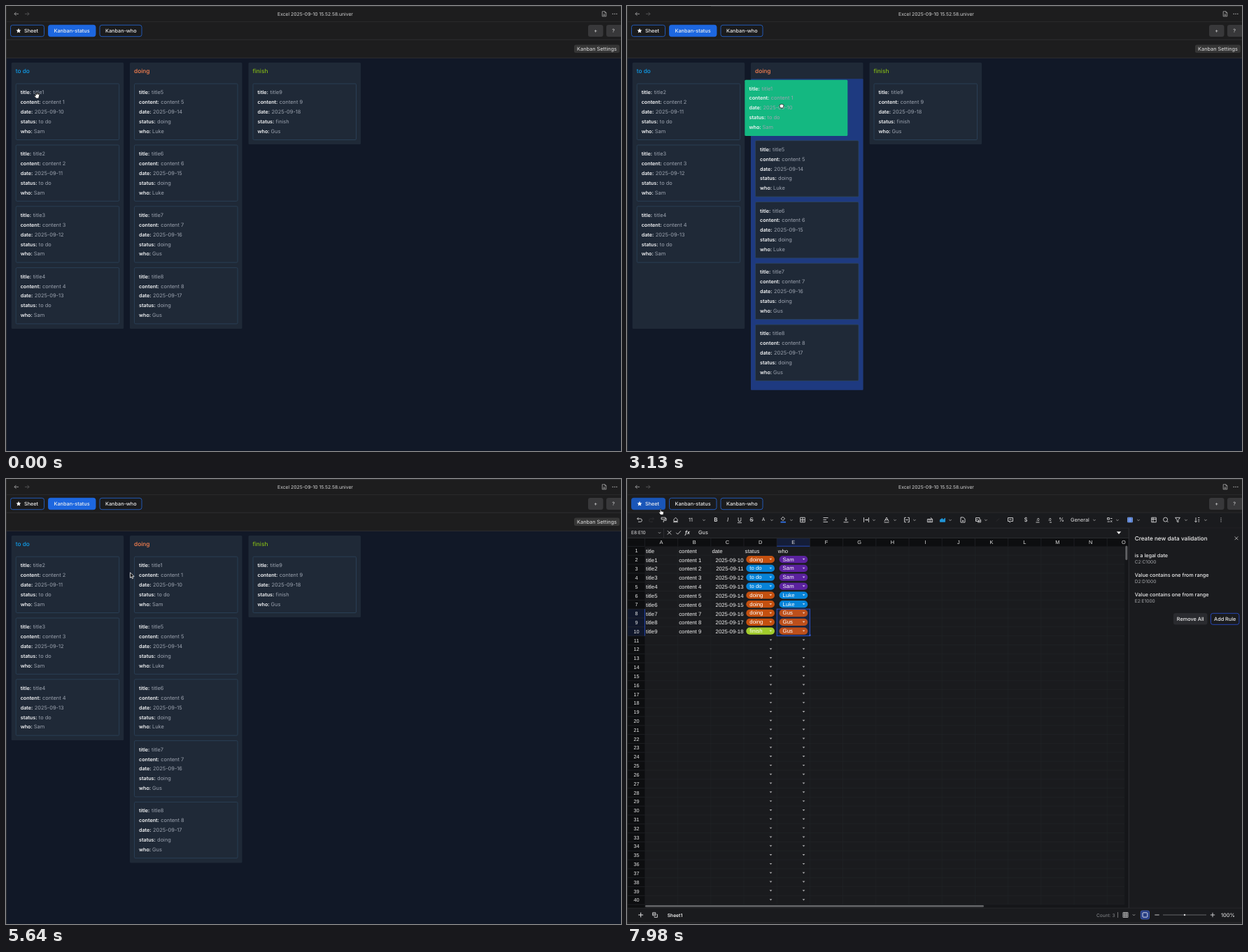
Animation, 879 px wide and 637 px high, one loop 8 s. Source, as an HTML page:

```html
<!DOCTYPE html>
<html lang="en">
<head>
<meta charset="utf-8">
<title>Kanban board</title>
<style>
  html, body { margin: 0; width: 100%; height: 100%; overflow: hidden; background: #111827; }
  svg { display: block; width: 879px; height: 637px; font-family: Inter, sans-serif; text-rendering: geometricPrecision; }
  .cell { font-family: "Liberation Sans", Arial, sans-serif; }
</style>
</head>
<body>
<svg id="stage" viewBox="0 0 879 637"></svg>
<script>
const stage = document.getElementById('stage');
const LOOP = 8000, TICK = 148;
const BLUE = '#1d67e0', PANEL = '#1f2937', LIGHT = '#e2e2e3';

// Drawing helpers
const text = (x, y, s, size = 7.3, fill = LIGHT, attrs = '') =>
  `<text x="${x}" y="${y}" font-size="${size}" fill="${fill}" ${attrs}>${s}</text>`;
const rect = (x, y, w, h, fill, r = 0, stroke = 'none', sw = 0.9) =>
  `<rect x="${x}" y="${y}" width="${w}" height="${h}" rx="${r}" fill="${fill}" stroke="${stroke}" stroke-width="${sw}"/>`;
const icon = (x, y, d, stroke = LIGHT, fill = 'none', sw = 0.85) =>
  `<path transform="translate(${x} ${y})" d="${d}" fill="${fill}" stroke="${stroke}" stroke-width="${sw}" stroke-linejoin="round"/>`;
const line = (x1, y1, x2, y2, c) => icon(0, 0, `M${x1} ${y1}L${x2} ${y2}`, c, 'none', 0.8);
const range = (a, b) => Array.from({ length: b - a + 1 }, (_, i) => a + i);
const MID = 'text-anchor="middle"', W5 = 'font-weight="500"', W6 = 'font-weight="600"';

// Linear interpolation over rows of [tick, ...values]
function at(keys, k) {
  const i = keys.findIndex(q => q[0] > k);
  if (i < 0) return keys[keys.length - 1].slice(1);
  if (i === 0) return keys[0].slice(1);
  const a = keys[i - 1], b = keys[i], f = (k - a[0]) / (b[0] - a[0]);
  return a.slice(1).map((v, j) => v + (b[j + 1] - v) * f);
}

// Data
const who = n => n < 5 ? 'Sam' : n < 7 ? 'Luke' : 'Gus';
const status = n => n < 5 ? 'to do' : n < 9 ? 'doing' : 'finish';
const date = n => `2025-09-${9 + n}`;

// Motion
const LIFT = 10, OVER = 17, DROP = 28, HOVER = 48, SHEET = 51, READY = 53;
const cursorPath = [
  [0, 45, 128], [4, 49.5, 133], [5, 49.5, 133], [6, 56.5, 147], [9, 56.5, 147], [12, 69, 141],
  [17, 190, 130], [18, 203, 134], [21, 221, 143], [23, 226, 143], [25, 226, 142.5], [29, 227, 142],
  [31, 229.5, 143], [32, 229.5, 143], [33, 230, 144], [35, 230, 144], [42, 113, 131], [43, 113, 131],
  [49, 36, 42], [50, 37, 42], [52, 38, 42], [53, 43, 44], [54, 49, 47]];
const dragPath = [[10, 15.5, 110], [12, 20.5, 107.5], [17, 110.5, 93], [18, 138, 95], [21, 168, 105.5],
  [23, 182, 107], [24, 182, 107], [28, 183.5, 111]];
const closeUp = [[10, 88], [11, 55], [12, 10], [13, 0]];
const makeRoom = [[17, 0], [18, 28], [19, 70], [20, 81.5]];
const shrink = [[29, 381], [31, 293]];

const HANDS = {
  grab: 'M-2.6.8-3.2-1.8q.5-1 1.2-.2l.5 1-.3-2.4q.8-.9 1.4 0l.3 1.9.3-1.8q.8-.8 1.3.1l-.1 2 .6-1.2q.9-.5 1.1.4l-.9 3.8q-.3 2-1 2.4h-2.9l-2.7-3q-.1-1.1.9-.9z',
  fist: 'M-3-.6q.3-1.8 1.6-1.4.8-.8 1.6-.2.9-.5 1.5.2 1.4-.1 1.3 1.2l-.4 2.2q-.5 1.4-1.2 1.6h-2.9q-1.3-1.2-1.5-3.6z',
  point: 'M-1.8.8V-3.8q.8-1.1 1.6 0V-1l2.7.6q1 .3.9 1.4l-.5 3.2h-4l-2.5-3.4q-.2-1.2.9-.8z',
  arrow: 'M-2.4-4.6V3.1l1.8-1.6 1.2 2.7 1.3-.6-1.2-2.6h2.4z'
};

function cursor(k) {
  const [x, y] = at(cursorPath, k);
  const onCard = y > 111 && (x < 162 || x > 183);
  const kind = k >= HOVER ? 'point' : k >= LIFT && k < 25 ? 'fist' : onCard ? 'grab' : 'arrow';
  return kind === 'arrow' ? icon(x, y, HANDS.arrow, '#fff', '#000', 0.8) : icon(x, y, HANDS[kind], '#111', '#fff', 0.8);
}

function card(n, x, y, dragged) {
  const rows = [['title', `title${n}`, 18], ['content', `content ${n}`, 31.3], ['date', date(n), 20],
    ['status', status(n), 26.1], ['who', who(n), 19]];
  const box = dragged ? rect(x + .3, y + .2, 147, 80.3, '#14b881', 1.5)
    : rect(x + .5, y + .5, 147.5, 80.3, PANEL, 1.5, '#2c455c', 0.8);
  const tx = x + (dragged ? 6.5 : 7);
  return box + rows.map(([key, value, dx], i) => {
    const ty = y + (dragged ? 15 : 15.5) + i * 13.92;
    return text(tx, ty, key + ':', 7.2, '#f3f4f6', W6) + text(tx + dx, ty, value, 7.45, '#9ca3af');
  }).join('');
}

const column = (x, h, name, color) =>
  rect(x, 81, 160.5, h, PANEL, 1.5) + text(x + 6, 95.8, name, 8.35, color, W5);
const stack = (list, x, y) => list.map((n, i) => card(n, x, y + i * 87.8)).join('');

function board(k) {
  const held = k >= LIFT && k < DROP, over = k >= OVER && k < DROP, moved = k >= DROP;
  const gap = over ? at(makeRoom, k)[0] : 0;
  const offset = k < LIFT ? 0 : at(closeUp, k)[0];
  const doingH = moved ? 468.5 : over ? 387 + gap : 381;
  return rect(0, 75, 879, 562, '#111827')
    + rect(812, 55.5, 65, 11.5, '#363636', 2.5) + text(844.5, 63.8, 'Kanban Settings', 7.35, LIGHT, MID)
    + column(7.7, at(shrink, k)[0], 'to do', '#109ae6')
    + column(177, doingH, 'doing', '#f9804f')
    + column(346.5, 117, 'finish', '#84b916')
    + (over ? rect(177, 104.3, 160.5, 364 + gap, '#1e3a80', 1) : '')
    + stack(range(k < LIFT ? 1 : 2, 4), 13.7, 110.7 + offset)
    + stack(moved ? [1, 5, 6, 7, 8] : range(5, 8), 183, 110.7 + gap)
    + stack([9], 352.5, 110.7)
    + (held ? card(1, ...at(dragPath, k), true) : '');
}

function tab(x, w, label, tx, on, hover) {
  const ink = hover ? '#1c56b8' : '#f0f0f0';
  const edge = hover ? '#1d3f86' : '#2460c4';
  return rect(x + .5, 27.3, w - 1, 16.4, on || '#1a1b1d', 3, on || edge) + text(tx, 38, label, 7.25, ink, W5);
}

function chrome(k) {
  const sheet = k >= SHEET, hover = k >= HOVER && !sheet;
  return rect(0, 0, 879, 74.5, '#1d1d1e')
    + line(120, .4, 879, .4, '#38383a') + line(0, 22.5, 879, 22.5, '#2c2c2e') + line(0, 48.2, 879, 48.2, '#343436')
    + icon(15, 11.3, 'M3 0H-3M-.5-2.5-3 0-.5 2.5', '#a8a8a8') + icon(30, 11.3, 'M-3 0H3M.5-2.5 3 0 .5 2.5', '#5c5c5c')
    + text(442, 13.8, 'Excel 2025-09-10 15.52.58.univer', 6.8, '#d4d4d4', MID)
    + icon(855, 11.3, 'M-2.8-3.5H1L2.8-1.7V3.5H-2.8zM1-3.5V-1.7H2.8M-1.4.6H1.4M-1.4 2H1.4', '#aaa', 'none', .8)
    + icon(870, 11.3, 'M-3.4 0h1.2M-.6 0h1.2M2.2 0h1.2', '#bbb', 'none', 1.2)
    + tab(6, 49, 'Sheet', 26, sheet && '#1a56b8', hover)
    + icon(18, 35.4, 'M0-3.6 1-1.2 3.5-1 1.6.7 2.2 3.2 0 1.9-2.2 3.2-1.6.7-3.5-1-1-1.2z', 'none', hover ? '#1c56b8' : '#fff')
    + tab(60, 68.5, 'Kanban-status', 68.5, !sheet && BLUE)
    + tab(133.5, 61, 'Kanban-who', 142, false)
    + rect(832, 27, 21.5, 17, '#38383a', 3) + text(842.7, 38, '+', 7.5, LIGHT, MID)
    + rect(858, 27, 25, 17, '#38383a', 3) + text(868, 38, '?', 7.3, LIGHT, MID)
    + (sheet ? '' : line(0, 74.3, 879, 74.3, '#343436'));
}

const CARET = 'M-1.7-.8 0 .9 1.7-.8';
const carets = [110, 207, 235, 263, 295, 325, 353, 383, 411, 462, 513, 668, 701, 731, 799, 827];
const tools = [
  [18, 'M-1.6-3.4-3.4-1.6-1.6.2M-3.4-1.6H1.2a2.2 2.2 0 0 1 0 4.4H-2'],
  [52.5, 'M-3.4-3.4H2.4V-.8H-3.4zM2.4-2.2H3.6V.8H-.3V3.6'],
  [69.5, 'M-3.3 3.2H3.3M-2.6 2V-.6L0-3.3 2.6-.6V2z'],
  [251, 'M-3.3-3.3H3.3V3.3H-3.3zM0-3.3V3.3M-3.3 0H3.3'],
  [284, 'M-3.5-3H3.5M-3.5 0H1M-3.5 3H3'],
  [313, 'M-3.4 3.3H3.4M0-3.5V1M-1.7-.6 0 1.2 1.7-.6'],
  [342, 'M-3.5-3.4V3.4M3.5-3.4V3.4M-2 0H2M.8-1.4 2.2 0 .8 1.4'],
  [371, 'M-3 2 0-3.5 3 2M-1.8 0H1.8M-3.4 3.5H3.4'],
  [400, 'M-1-3.2H-3.4V3.2H-1M1-3.2H3.4V3.2H1M-2.2 0H2.2'],
  [433, 'M-3.6-1H3.6V3.2H-3.6zM-1.2-1V3.2M1.2-1V3.2M1-3.4 3-1'],
  [480, 'M-3-3.6H.8L3-1.4V3.6H-3zM-.8.6 1 2.4M1 .6-.8 2.4'],
  [502, 'M-3.5-3H2V2H-3.5zM-3.5 1-1.4-1 1.5 2M3.6-.6V3.4H-1'],
  [548, 'M-3.5-3H3.5V2H.8L-1 3.6V2H-3.5zM-1.8-.5H1.8'],
  [690, 'M-3.4-3H-.6V-.4H-3.4zM1-2H3.5M-3.4 2.6H.2M1.2 1 3.4 3.2M3.4 1 1.2 3.2'],
  [753, 'M-3.3-3.3H3.3V3.3H-3.3zM-3.3-1H3.3M-1-3.3V3.3'],
  [770, 'M2.6-.4A3 3 0 1 1-3.4-.4 3 3 0 1 1 2.6-.4M1.7 1.7 3.5 3.5'],
  [787, 'M-3.4-3.2H3.4L.9.2V3.4L-.9 2.4V.2z'],
  [815, 'M-2-3.4V3.2M-3.6 1.6-2 3.3-.4 1.6M1-3H3.4M1 0H3.4M2.2 3.4V1.4']];
const letters = [['B', 127, W6], ['I', 144, 'font-style="italic"'], ['U', 161, 'text-decoration="underline"'],
  ['S', 178, 'text-decoration="line-through"'], ['$', 570, ''], ['%', 621, '']];

function toolbar(ready) {
  const items = tools.map(([x, d]) => icon(x, 58.5, d)).join('')
    + carets.map(x => icon(x, 58.8, CARET, '#aaa')).join('')
    + letters.map(([s, x, a]) => text(x, 61.3, s, 8, LIGHT, `${MID} ${a}`)).join('')
    + icon(35, 58.5, 'M1.6-3.4 3.4-1.6 1.6.2M3.4-1.6H-1.2a2.2 2.2 0 0 0 0 4.4H2', '#303033')
    + text(91, 61.2, '11', 7.3, LIGHT, MID) + text(195, 59.8, 'A', 6.6, LIGHT, MID) + line(192, 62.5, 198, 62.5, '#222')
    + icon(223, 57.5, 'M-2.8-.6 0-3.3 2.6-.6-.2 2z') + rect(219.5, 60.8, 7.5, 1.8, '#2f6fe4')
    + icon(451, 58.5, 'M-3.6 2.8V0L-.5-2 1 0 3.6-2.6V2.8z', '#2196d8', '#2196d8')
    + icon(530, 58.5, 'M-2 2 2-2', '#303033')
    + text(587, 60, '.0', 5.6, LIGHT, MID + W5) + icon(587, 62, 'M-2.5 0H2.5')
    + text(604, 60, '.0', 5.6, LIGHT, MID + W5) + icon(604, 62, 'M0 0H3')
    + text(634, 61.2, 'General', 7.3)
    + icon(719, 58.5, 'M-3.3-3.3H3.3V3.3H-3.3z', '#8bb0f0', '#2b5fd0') + icon(719, 58.5, 'M-3.3-1H3.3M-3.3 1.2H3.3M0-3.3V3.3', '#dbe6ff', 'none', .6);
  return `<g opacity="${ready ? 1 : .35}">${items}</g>`
    + icon(849, 58.5, 'M0-3v1.1M0-.5v1.1M0 2v1.1', LIGHT, 'none', 1.1);
}

const COL = 47.2, ROW = 12.82, LEFT = 25.4, TOP = 96.4;
const rowMid = n => TOP + ROW * (n - .5);
const cell = (x, y, s, attrs = '', fill = '#f2f2f2', size = 7.8) => text(x, y, s, size, fill, `class="cell" ${attrs}`);
const drop = (x, y, c) => icon(x, y, 'M-1.9-1H1.9L0 1.2z', 'none', c);
const chip = (x, y, s, color) => rect(x, y - 5.7, 40.7, 10.3, color, 5.1)
  + cell(x + 5, y + 1.9, s, '', '#fff') + drop(x + 35, y - .8, '#ffffffb0');
const tint = { 'to do': '#0683d8', doing: '#c4500f', finish: '#a2cc2c', Sam: '#5b229f', Luke: '#0683d8', Gus: '#bd4f1b' };

function grid() {
  const lines = range(1, 14).map(i => `M${LEFT + COL * i} ${TOP}V611`).join('')
    + range(1, 40).map(i => `M${LEFT} ${TOP + ROW * i}H711`).join('');
  let s = rect(1, 85, 716, 529, '#1a1b1e') + icon(0, 0, lines, '#222428', 'none', .7)
    + rect(1, 85, 716, 11.4, '#0d0e10') + rect(1, 85, 24.4, 529, '#0d0e10')
    + rect(LEFT + COL * 4, 85, COL, 11.4, '#141d38') + rect(1, TOP + ROW * 7, 24.4, ROW * 3, '#10172b')
    + icon(0, 0, range(0, 14).map(i => `M${LEFT + COL * i} 85V96.4`).join('') + range(0, 40).map(i => `M1 ${TOP + ROW * i}H25.4`).join(''), '#292b30', 'none', .6);
  range(0, 14).forEach(i => s += cell(LEFT + COL * (i + .5), 93.1, String.fromCharCode(65 + i), MID, '#e6e6e6', 7.4));
  ['title', 'content', 'date', 'status', 'who'].forEach((h, i) => s += cell(27 + COL * i, rowMid(1) + 3, h));
  s += rect(LEFT + COL * 4, TOP + ROW * 7, COL, ROW * 3, '#1b2540');
  for (const n of range(1, 40)) {
    const y = rowMid(n), i = n - 1;
    s += cell(13.5, y + 2.6, n, MID, '#e6e6e6', 7.3);
    if (n > 10) s += drop(205.5, y - .6, '#a9a9ab') + drop(252.5, y - .6, '#a9a9ab');
    else if (n > 1) {
      const state = i === 1 ? 'doing' : status(i);
      s += cell(27, y + 3, `title${i}`) + cell(74.2, y + 3, `content ${i}`) + cell(166.5, y + 3, date(i), 'text-anchor="end"')
        + chip(170.3, y, state, tint[state]) + chip(217.6, y, who(i), tint[who(i)]);
    }
  }
  return s + rect(LEFT + COL * 4, TOP + ROW * 7, COL, ROW * 3, 'none', 0, '#2a55d8')
    + rect(260.5, 222.6, 2, 2, '#3a66ee')
    + line(25.4, TOP + ROW * 7, 25.4, TOP + ROW * 10, '#2a55d8') + line(214.2, 96.2, 261.4, 96.2, '#2a55d8')
    + rect(711.3, 96.4, 5.5, 517, '#151619') + rect(712.3, 95.5, 3, 20.5, '#606164', 1.5)
    + rect(26, 609.4, 690, 4.6, '#151619') + rect(26, 610, 484, 2.8, '#606164', 1.4);
}

function sidebar() {
  const rules = [['is a legal date', 'C2:C1000'], ['Value contains one from range', 'D2:D1000'], ['Value contains one from range', 'E2:E1000']];
  return rect(717, 70.3, 162, 543.7, '#1a1b1e') + line(717.2, 70.3, 717.2, 614, '#35373b')
    + text(725.7, 87.8, 'Create new data validation', 8.2, '#f0f0f0', W5)
    + icon(871, 84.8, 'M-2.4-2.4 2.4 2.4M2.4-2.4-2.4 2.4', '#bbb')
    + rules.map(([a, b], i) => text(725.7, 111.8 + 28 * i, a, 7.25, '#f0f0f0', W5) + text(725.7, 121.3 + 28 * i, b, 6.6, '#a2a4a8')).join('')
    + rect(781, 192, 48.5, 16.5, '#2a2b2f', 3) + text(805.2, 202.9, 'Remove All', 7.3, '#f0f0f0', MID + W5)
    + rect(834.4, 192.3, 40.5, 16, '#1a1b1e', 3, '#2a4bc4') + text(854.7, 202.9, 'Add Rule', 7.3, '#f0f0f0', MID + W5);
}

function footer() {
  return rect(0, 614, 879, 23, '#1a1b1e') + line(0, 614.2, 879, 614.2, '#2a2b2f') + line(0, 635.2, 879, 635.2, '#303134')
    + icon(19.7, 624, 'M-3.4 0H3.4M0-3.4V3.4', LIGHT, 'none', 1)
    + icon(40, 624, 'M-3.3-3.3H.8V.8H-3.3zM-3.3-1.2H.8M2.4-.8H3.4V3.4H-.8V2.2') + text(57.7, 626.6, 'Sheet1', 6.7, '#f4f4f4', W6)
    + text(671, 626.5, 'Count: 3', 6.6, '#8b8d91') + line(701.5, 620, 701.5, 628, '#888')
    + icon(712.5, 624, 'M-3.5-3.5H3.5V3.5H-3.5zM-1.2-3.5V3.5M1.2-3.5V3.5M-3.5-1.2H3.5M-3.5 1.2H3.5', LIGHT, 'none', .7)
    + icon(724.5, 624, CARET, '#aaa')
    + rect(734.3, 618, 12.2, 12, '#263c80', 2, '#4a6bcd', .7) + rect(737, 620.8, 6.8, 6.4, 'none', .8, '#e8eeff', .9)
    + icon(757.5, 624, 'M-3.2 0H3.2') + line(766, 624, 828, 624, '#77797d')
    + '<circle cx="797" cy="624" r="1.2" fill="#ddd"/>'
    + icon(837, 624, 'M-3.2 0H3.2M0-3.2V3.2') + text(849, 626.7, '100%', 7.5, '#f0f0f0');
}

function sheet(ready) {
  return rect(0, 48.6, 879, 588, '#1a1b1e') + toolbar(ready) + line(0, 70.3, 879, 70.3, '#2c2d31')
    + (ready ? text(6, 79.3, 'E8:E10', 6.6) + text(102, 79.4, 'Gus', 7.4, '#f2f2f2') : '')
    + icon(46.5, 77, CARET, '#aaa') + line(52.5, 71, 52.5, 84, '#303236')
    + icon(60.5, 76.8, 'M-2.7-2.7 2.7 2.7M2.7-2.7-2.7 2.7') + icon(73.5, 76.8, 'M-3.2 0-1 2.3 3.3-2.5')
    + text(86.5, 79.3, 'fx', 7.4, '#f0f0f0', `${MID} ${W6} font-style="italic"`)
    + icon(703, 77, 'M-3.2-1.8H3.2L0 2z', 'none', '#eee') + line(0, 84.6, 717, 84.6, '#303236')
    + (ready ? grid() : '') + sidebar() + footer();
}

function draw(k) {
  return rect(0, 0, 879, 637, '#111827') + chrome(k) + (k >= SHEET ? sheet(k >= READY) : board(k))
    + line(.6, 0, .6, 637, '#343436') + cursor(k);
}

// The picture advances in even ticks; the sheet's last two steps come at their own times.
const tickAt = t => t < 7600 ? Math.floor(t / TICK) : 52 + (t >= 7795) + (t >= 7970);

const start = performance.now();
let shown = -1;
function frame() {
  const k = tickAt((performance.now() - start) % LOOP);
  if (k !== shown) stage.innerHTML = draw(shown = k);
  requestAnimationFrame(frame);
}
frame();
</script>
</body>
</html>
```
